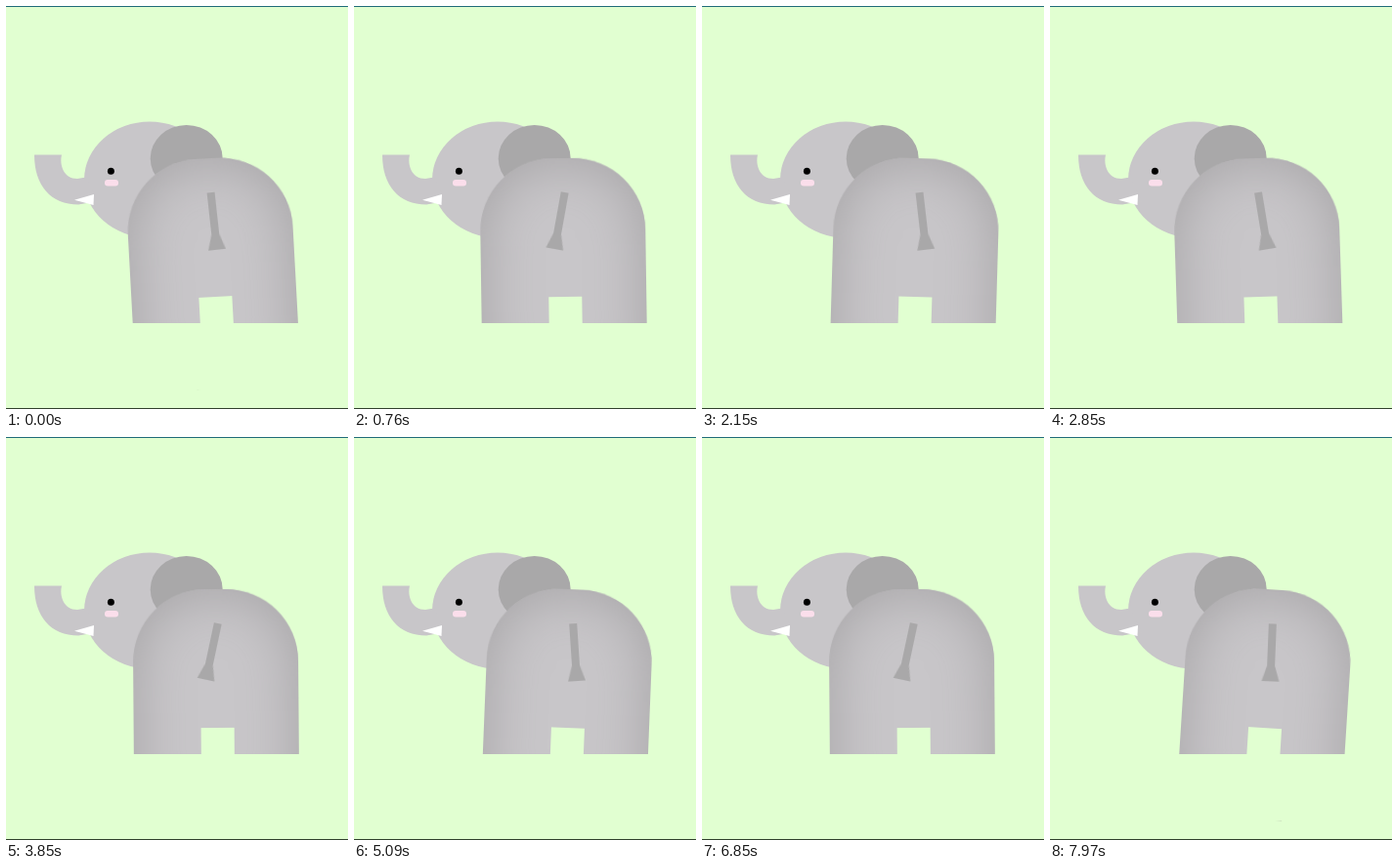
Recreate the animation shown at these times as an HTML page. Size 350 by 413 pixels, loop 8000 ms.

```html
<!DOCTYPE html>
<html lang="en">
<head>
<meta charset="utf-8">
<title>Swaying elephant</title>
<style>
  :root { --meadow: #e1ffd1; --skin: #c8c6c9; --shade: #a9a8a9; }
  html, body { margin: 0; width: 100%; height: 100%; overflow: hidden; background: var(--meadow); }
  .stage { position: relative; width: 350px; height: 413px; overflow: hidden; }
  .stage * { position: absolute; box-sizing: border-box; }
  .layer { inset: 0; }
  .edge { left: 0; width: 100%; height: 1px; }
  .edge.top { top: 0; background: #1f6b78; }
  .edge.bottom { bottom: 0; background: #30402c; }

  .above-ground { clip-path: inset(0 0 88px 0); }
  .below-ground { clip-path: inset(393px 0 0 0); }

  .sway { transform-origin: 216px 347px; animation: sway 3s infinite; }
  .body {
    left: 130.8px; top: 155.5px; width: 169px; height: 237px;
    border-radius: 74px 74px 0 0;
    background: var(--skin);
    box-shadow: inset 0 0 60px #a4a2a4;
  }
  .gap { left: 199.5px; top: 298px; width: 34.5px; height: 95px; background: var(--meadow); }
  .tail {
    left: 208.8px; top: 191px; width: 18px; height: 59px;
    background: var(--shade);
    clip-path: polygon(5px 0, 13px 0, 13px 43px, 100% 100%, 0 100%, 5px 43px);
    transform-origin: 50% 0;
    animation: swing 3s infinite;
  }
  .foot-line { left: 193px; top: 391.2px; width: 47px; height: 1px; background: #b4bfae; }

  @keyframes sway {
    0%, 100% { transform: rotate(-4deg); }
    25%, 75% { transform: rotate(0deg); }
    50% { transform: rotate(4deg); }
  }
  @keyframes swing {
    0%, 50%, 100% { transform: rotate(0deg); }
    25% { transform: rotate(14deg); }
    75% { transform: rotate(-14deg); }
  }
</style>
</head>
<body>
<div class="stage">
  <svg class="layer" width="350" height="413" viewBox="0 0 350 413">
    <g fill="#c8c6c9">
      <ellipse cx="147" cy="178" rx="67" ry="59.5"/>
      <path d="M29 152.5H57C54.5 163 59 177 73 177L82 175.5 94 200 74 203.5C46 203.5 29 184 29 152.5Z"/>
    </g>
    <ellipse cx="184.7" cy="156.2" rx="37" ry="34.2" fill="#a9a8a9"/>
    <path d="M70 198.7 90 193 89.5 204Z" fill="#fff"/>
    <circle cx="107.4" cy="169.3" r="3.5"/>
    <rect x="101" y="178" width="14" height="6.5" rx="3" fill="#fbdeeb"/>
  </svg>

  <div class="layer above-ground">
    <div class="layer sway">
      <div class="body"></div>
      <div class="gap"></div>
      <div class="tail"></div>
    </div>
  </div>
  <div class="layer below-ground">
    <div class="layer sway"><div class="foot-line"></div></div>
  </div>

  <div class="edge top"></div>
  <div class="edge bottom"></div>
</div>
<script>
  // The 3 s sway does not divide the 8 s loop, so the loop cuts back to its opening pose.
  const LOOP = 8000, OPENING = 2605;
  const animations = document.getAnimations();
  animations.forEach(a => a.pause());

  let start;
  function tick(now) {
    start ??= now;
    const time = (now - start) % LOOP + OPENING;
    animations.forEach(a => { a.currentTime = time; });
    requestAnimationFrame(tick);
  }
  requestAnimationFrame(tick);
</script>
</body>
</html>
```
